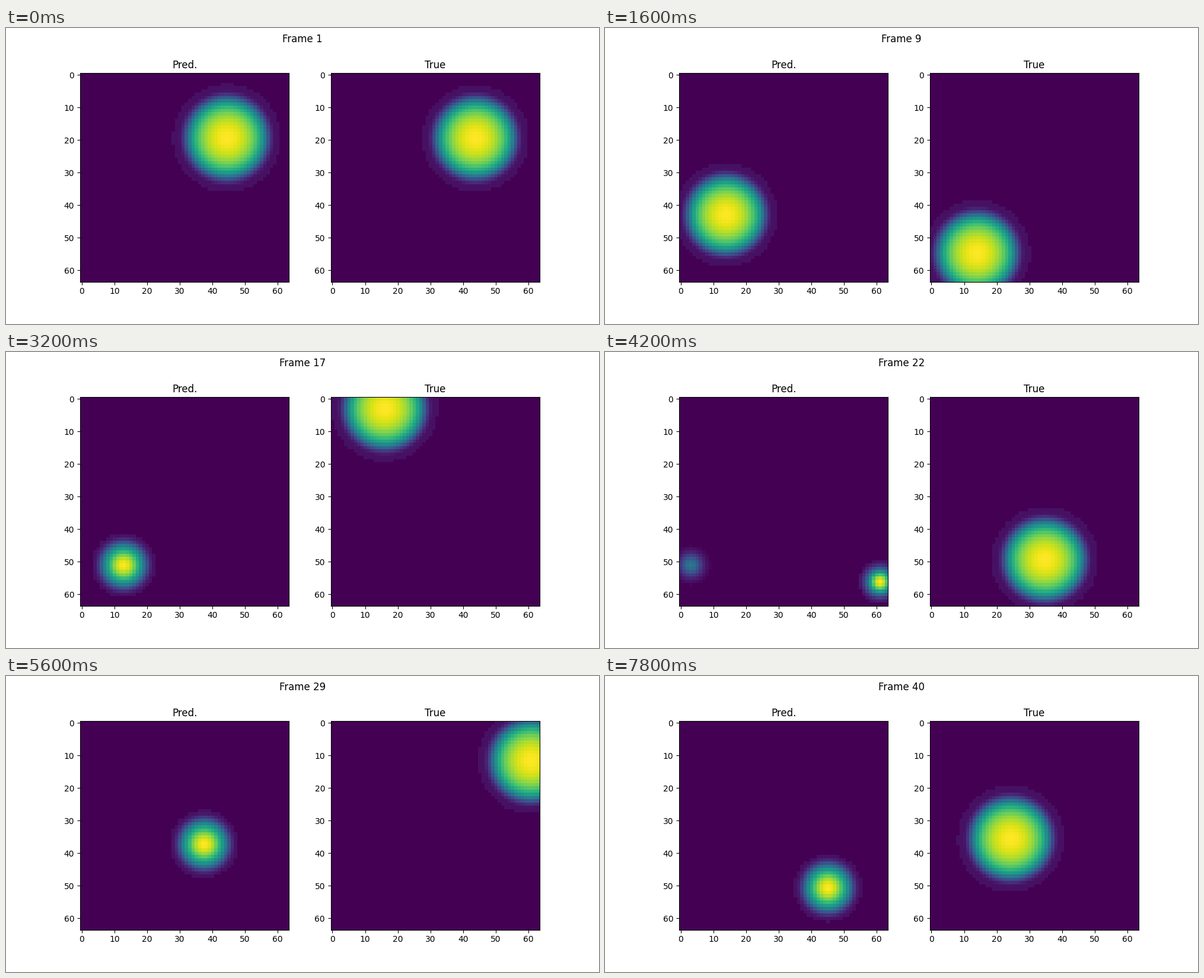
A matplotlib script for the animation above (8 s loop, 1000x500 px).

```python
import numpy as np
import matplotlib.pyplot as plt
from matplotlib.animation import FuncAnimation

SIZE = 64
FRAMES = 40
BALL_R = 16.3
HALO = 0.045

cols, rows = np.meshgrid(np.arange(SIZE), np.arange(SIZE))


def ease(k, start, end):
    t = np.clip((k - start) / (end - start), 0, 1)
    return t * t * (3 - 2 * t)


def blob(x, y, radius=BALL_R):
    r = np.hypot(cols - x, rows - y) / radius
    d = r * BALL_R
    ball = (1 - 0.0035 * d ** 2) / (1 + np.exp((d - 12.8) / 1.1))
    # Small blobs lose their plateau and turn into a bell
    soft = np.clip((16 - radius) / 10, 0, 1)
    level = (1 - soft) * ball + soft * np.exp(-0.5 * (r / 0.4) ** 2)
    return np.where(r < 1, np.maximum(level, HALO), 0)


def bounce(p):
    wall = SIZE - 1
    p = p % (2 * wall)
    return min(p, 2 * wall - p)


def true_image(k):
    return blob(bounce(43.7 - 3.73 * k), bounce(19.5 - 9.28 * k))


def first_blob(k):
    """Touches the top, settles at the lower left, sways and fades."""
    glide = 3 + 41.4 * np.exp(-(k / 7.11) ** 2.5)
    sway = 12.8 - 0.39 * (k - 16) ** 2
    y = 51 * (1 - np.exp(-((k - 2.7) / 3.9) ** 2))
    radius = min(16.5, 21.8 - 0.75 * k)
    return blob(max(glide, sway), y, radius)


def second_blob(k):
    """Grows in from the lower right, then turns back down."""
    enter = ease(k, 20, 28)
    x = 62 - 24.6 * enter + 7.6 * ease(k, 31, 37)
    y = 57 - 19.8 * enter + 13.4 * ease(k, 28, 39)
    return blob(x, y, 6.4 + 4 * enter)


def pred_image(k):
    fade_out = np.clip((23 - k) / 5, 0, 1)
    fade_in = np.clip((k - 18) / 3, 0, 1)
    image = np.zeros((SIZE, SIZE))
    if fade_out > 0:
        image += fade_out * first_blob(k)
    if fade_in > 0:
        image += fade_in * second_blob(k)
    return image


fig, axes = plt.subplots(1, 2, figsize=(10, 5), dpi=100)
heading = fig.suptitle("Frame 1")
views = []
for ax, title in zip(axes, ("Pred.", "True")):
    ax.set_title(title)
    views.append(ax.imshow(np.zeros((SIZE, SIZE)), cmap="viridis",
                           vmin=0, vmax=1))


def draw(k):
    heading.set_text(f"Frame {k + 1}")
    for view, image in zip(views, (pred_image(k), true_image(k))):
        view.set_data(image / image.max())
    return [heading, *views]


anim = FuncAnimation(fig, draw, frames=FRAMES, interval=200,
                     init_func=lambda: draw(0), repeat=True, repeat_delay=0)
plt.show()
```
